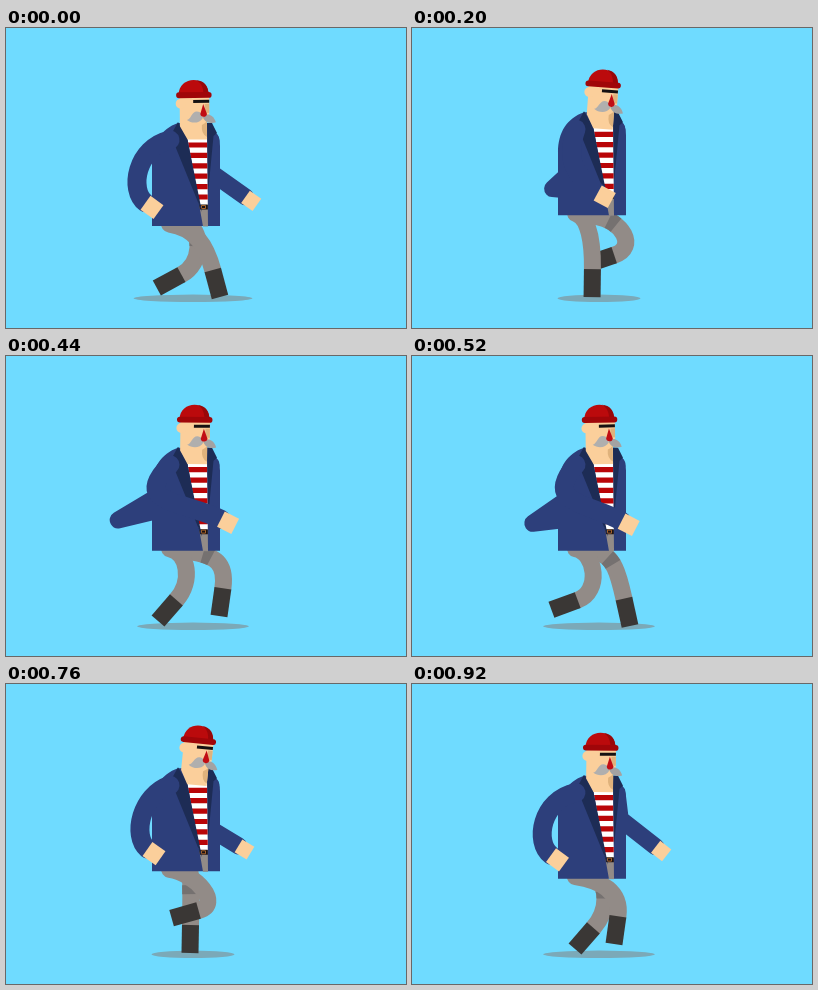
Write an HTML page that moves like this. It is 400 by 300 pixels and loops after 960 ms.

```html
<!DOCTYPE html>
<html lang="en">
<head>
<meta charset="utf-8">
<title>Walking sailor</title>
<style>
  html, body { margin: 0; width: 100%; height: 100%; overflow: hidden; background: #6fdbff; }
  svg { display: block; width: 400px; height: 300px; }
  .limb { fill: none; stroke-width: 17; }
  .pants { stroke: #928b87; stroke-linecap: round; }
  .boot { stroke: #3a3735; }
  .sleeve { stroke: #2d3f7b; stroke-linecap: round; stroke-linejoin: round; }
  .hand { stroke: #fbcf9b; }
  .coat { fill: #2d3f7b; }
  .dark { fill: #1d2c55; }
  .skin { fill: #fbcf9b; }
</style>
</head>
<body>
<svg viewBox="0 0 400 300">
  <defs>
    <clipPath id="opening"><path d="M176 94H201L202 198.5H197L181 108Z"/></clipPath>
  </defs>
  <ellipse id="shadow" cx="187" cy="270.300" ry="3.700" fill="#7ba9b8"/>

  <g id="farArm">
    <path class="limb sleeve"/>
    <path class="limb hand" style="stroke-width:15"/>
  </g>
  <g id="farLeg">
    <path class="limb pants"/>
    <path class="limb boot"/>
    <path class="limb" stroke="#757170" stroke-dasharray="0 13 9 400"/>
  </g>
  <g id="nearLeg">
    <path class="limb pants"/>
    <path class="limb boot"/>
  </g>

  <g id="body">
    <path class="coat" d="M146 198V135C146 115 155 101 172 95H205L209 104Q214 108 214 118V198Z"/>
    <g clip-path="url(#opening)">
      <path fill="#928b87" d="M170 176h40v24h-40z"/>
      <path fill="#fff" d="M170 94h40v83h-40z"/>
      <path id="stripes" fill="none" stroke="#b90508" stroke-width="5.200"/>
      <path fill="#1b1214" d="M170 176.500h40v5h-40z"/>
      <path fill="none" stroke="#a5622a" d="M195.500 177.500h4v3h-4z"/>
    </g>
    <path class="dark" d="M172 94L166 105L171 108.500L167.500 114L196 184L181 109Z"/>
    <path class="dark" d="M201 95H206L211 105L207.500 108L202 165Z"/>

    <g id="head">
      <path class="skin" d="M174 68H203.500V86L201 92V111.500H181.500L174 98Z"/>
      <circle class="skin" cx="175" cy="75.500" r="5"/>
      <path fill="#dfb27c" d="M199 76h4.500v9h-4.500zM196 97Q200 95 201 93V109Q195 106 196 97Z"/>
      <path fill="#151112" d="M187.500 72h16v3h-16z"/>
      <path fill="#b0afae" d="M181 92C185 91.500 186 83.500 191 83.500C195 83.500 197 87 197 90C194 95.500 186 96 181 92Z"/>
      <path fill="#a3a2a2" d="M197 89C199 85.500 207 85 210 94.500C205 96 199 95 197 89Z"/>
      <path fill="#c10d14" d="M197.500 76L194.500 86A3.400 3.400 0 0 0 201.200 86Z"/>
      <path fill="#bb0a0c" d="M173 67C173 47 203 47 203 67Z"/>
      <path fill="#980709" d="M191 52.200C199 53 203 58 203 67H198C198 60 196 55 191 52.200Z"/>
      <rect fill="#a00609" x="170.500" y="64.200" width="35.500" height="5.800" rx="2.900"/>
    </g>

    <g id="nearArm">
      <path class="limb sleeve" style="stroke-width:19"/>
      <path class="limb hand"/>
    </g>
  </g>
</svg>
<script>
const LOOP = 960, STEP = 40, TURN = 2 * Math.PI;
const $ = id => document.getElementById(id);
const polar = deg => [Math.cos(deg * TURN / 360), Math.sin(deg * TURN / 360)];

// One gait for both legs: time, toe x, toe y, boot angle
const gait = [
  [0, 214, 269, 75], [120, 188, 269, 90], [280, 173, 269, 91], [360, 158, 268, 101],
  [440, 152, 265, 131], [500, 137, 257, 158], [600, 159, 241.5, 156],
  [720, 166, 235, 163], [840, 168, 237, 157], [920, 202, 260, 98]
];

// Near arm poses: upper control, lower control, wrist, hand angle
const back = [129, 119, 122, 162, 139, 174.5, 36];
const middle = [158, 140, 155, 162, 169.5, 178.5, 30];
const front = [124, 152, 178, 148, 215, 166.5, 27];

// Smooth periodic interpolation through the keys
function sample(keys, t) {
  const n = keys.length;
  const at = k => keys[(k + n) % n];
  const time = k => at(k)[0] + Math.floor(k / n) * LOOP;
  let i = n - 1;
  while (keys[i][0] > t) i--;
  const span = time(i + 1) - time(i), u = (t - time(i)) / span;
  const slope = (k, j) => (at(k + 1)[j] - at(k - 1)[j]) / (time(k + 1) - time(k - 1)) * span;
  return at(i).slice(1).map((a, k) => {
    const j = k + 1, b = at(i + 1)[j], m = slope(i, j), q = slope(i + 1, j);
    return a + u * (m + u * (3 * (b - a) - 2 * m - q + u * (2 * (a - b) + m + q)));
  });
}

function setPaths(id, ...paths) {
  const parts = $(id).children;
  paths.forEach((d, i) => parts[i].setAttribute("d", d));
}

function leg(id, t, hipX, hipY, shift) {
  const [x, toeY, deg] = sample(gait, t % LOOP);
  const [dx, dy] = polar(deg), toeX = x + shift;
  const ax = toeX - dx * 28, ay = toeY - dy * 28;
  const shinX = ax - dx * 25, shinY = ay - dy * 25;
  const kneeX = hipX + Math.min(0.8 * (shinX - hipX), 26);
  const thigh = `M${hipX} ${hipY}C${kneeX} ${hipY + 4} ${shinX} ${shinY} ${ax} ${ay}`;
  const paths = [thigh, `M${ax} ${ay}L${toeX} ${toeY}`, thigh];
  setPaths(id, ...paths.slice(0, $(id).children.length));
}

function hand(x, y, deg, length) {
  const [dx, dy] = polar(deg);
  return `M${x} ${y}l${dx * length} ${dy * length}`;
}

function nearArm(swing) {
  const s = Math.sin(swing * TURN / 4);
  const [ax, ay, bx, by, wx, wy, deg] = middle.map((m, i) =>
    m + s * (back[i] - front[i]) / 2 + s * s * ((back[i] + front[i]) / 2 - m));
  setPaths("nearArm", `M164 112C${ax} ${ay} ${bx} ${by} ${wx} ${wy}`, hand(wx, wy, deg, 16));
}

function farArm(swing) {
  const lean = 43 * swing - 6, bend = 16 + 0.62 * lean;
  const [down, out] = polar(lean), [dx, dy] = polar(bend);
  const wx = 205 + 66.5 * out, wy = 112 + 66.5 * down;
  setPaths("farArm", `M205 112L${wx - dx * 45} ${wy - dy * 45}L${wx} ${wy}`, hand(wx, wy, bend, 14));
}

function draw(t) {
  const half = t % 480;
  const rise = 1 - Math.abs(1 - half / 240);
  const dy = -11 * (1 - (1 - rise) ** 2);
  const lean = 2.4 - 3.4 * Math.cos(TURN * (half - 40) / 480);
  const swing = Math.cos(TURN * (t + 80) / LOOP);
  $("shadow").setAttribute("rx", 59.5 - 21.5 * rise);
  for (const id of ["body", "farArm"]) $(id).setAttribute("transform", `translate(0 ${dy})`);
  $("head").setAttribute("transform", `rotate(${lean} 188 108)`);
  leg("nearLeg", t, 163.5, 196 + dy, 0);
  leg("farLeg", t + LOOP / 2, 184, 199 + dy, 11);
  nearArm(swing);
  farArm(swing);
}

let stripes = "";
for (let y = 117; y < 176; y += 10.4) stripes += `M170 ${y}h40`;
$("stripes").setAttribute("d", stripes);

const start = performance.now();
function tick() {
  const t = (performance.now() - start) % LOOP;
  draw(Math.floor(t / STEP) * STEP);
  requestAnimationFrame(tick);
}
tick();
</script>
</body>
</html>
```
